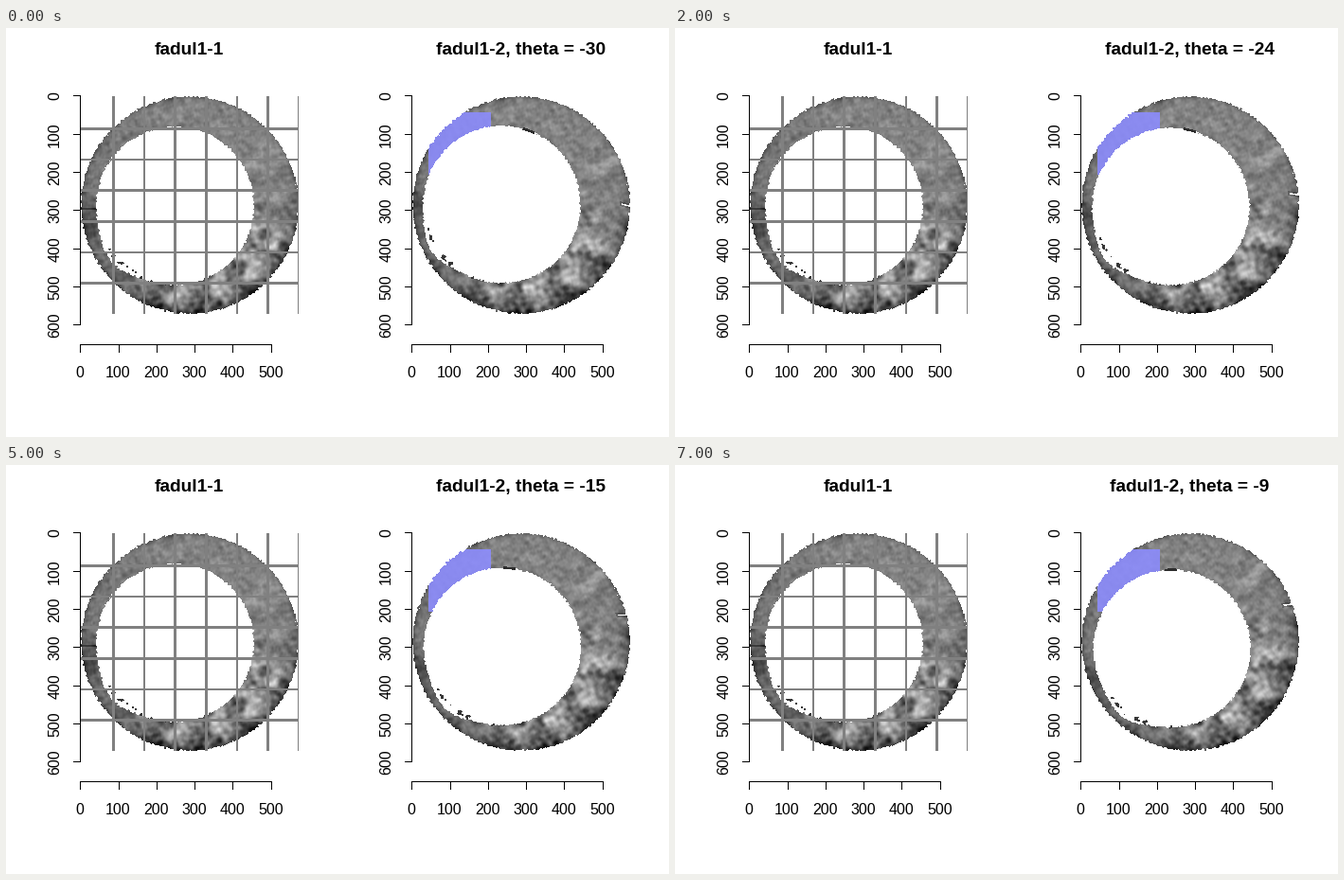
A matplotlib script that plays this animation: 700 by 432 pixels, repeating every 8 s.

```python
import numpy as np
import matplotlib.pyplot as plt
from matplotlib.animation import FuncAnimation

W, H, DPI = 700, 432, 100
PX = 72 / DPI    # points per pixel
SIZE = 230       # side of a scan in pixels
SCALE = 0.4031   # screen pixels per axis unit
TOP = 72
LEFT_X, RIGHT_X = 79, 429
THETAS = range(-30, -8, 3)

plt.rcParams["font.family"] = "Liberation Sans"
fig = plt.figure(figsize=(W / DPI, H / DPI), dpi=DPI, facecolor="white")
ax = fig.add_axes([0, 0, 1, 1])


def waves(seed, count, short, long):
    """Smooth random field as a sum of plane waves, unit variance."""
    rng = np.random.default_rng(seed)
    k = 2 * np.pi / rng.uniform(short, long, count)
    ang = rng.uniform(0, 2 * np.pi, count)
    phase = rng.uniform(0, 2 * np.pi, count)

    def field(x, y):
        total = np.zeros_like(x)
        for ki, a, p in zip(k, ang, phase):
            total += np.cos(ki * (x * np.cos(a) + y * np.sin(a)) + p)
        return total / np.sqrt(count / 2)

    return field


coarse = waves(3, 24, 16, 40)
cells = waves(5, 50, 7, 13)
fine = waves(8, 40, 3, 7)


def polar(x, y):
    return np.hypot(x, y), np.degrees(np.arctan2(-y, x))


def bump(angle, at, width):
    """Soft bell around a direction in degrees."""
    gap = (angle - at + 180) % 360 - 180
    return np.exp(-(gap / width) ** 2)


def shade(x, y, shift):
    """Grey levels: a lit top, and bright radial bands along the lower right."""
    d, p = polar(x, y)
    depth = 114.6 - d
    low = np.exp(-((p + 68 - shift) / 66) ** 4)
    bands = np.cos(np.radians(p + 18 - shift + 3 * coarse(x, y)) * 360 / 26)
    rim = np.exp(-(depth / 13) ** 2)

    tone = 118 + 13 * np.cos(np.radians(p - 65))
    tone += 20 * bump(p, 34 + shift, 4) - 35 * bump(p, shift - 170, 8)
    tone += low * (1 - rim) * (32 + 42 * bands)
    tone += low * rim * (30 * bands - 28)
    tone += (1 + 0.9 * low) * (6 * coarse(x, y) + 7 * cells(x, y))
    tone += 3 * fine(x, y)
    return tone - 38 * np.exp(-np.clip(depth, 0, None) / 2)


def ring(hole, radius, shift, turn=0):
    """Tone, mask and local coordinates of a scan turned counter-clockwise."""
    c = (SIZE - 1) / 2
    py, px = np.mgrid[:SIZE, :SIZE] - c
    a = np.radians(turn)
    x = px * np.cos(a) - py * np.sin(a)
    y = px * np.sin(a) + py * np.cos(a)

    rough = fine(x, y)
    rho, phi = polar(x - hole[0], y - hole[1])
    inner = radius + 6 * bump(phi, shift - 138, 18)
    inside = np.hypot(x, y) < 114.6 + 0.5 * rough
    mask = inside & (rho + 0.5 * rough > inner)
    tone = shade(x, y, shift)

    # loose dark crumbs along the lower left rim
    near = bump(phi, shift - 125, 32) * np.exp(-((rho - radius) / 2.5) ** 2)
    crumbs = inside & (near * (cells(x, y) + 0.6 * rough) > 0.55)
    tone[crumbs] = 55
    return tone, mask | crumbs, x, y


def picture(tone, mask):
    rgb = np.repeat(np.clip(tone, 15, 248)[..., None], 3, axis=2)
    rgb[~mask] = 255
    return rgb


def gridded_scan():
    tone, mask, x, y = ring((-15.5, 0.8), 83.3, 0)
    tone[(np.abs(y - 4) < 1.5) & (x < -97)] -= 45
    rgb = picture(tone, mask)
    unit = (np.arange(SIZE) + 0.5) / SCALE
    on = (unit > 81) & ((unit - 82) % 81 < 6.2)
    rgb[:, on] = 128
    rgb[on & (unit < 560)] = 128
    return rgb.astype(np.uint8)


def turned_scan(theta):
    hole, radius = (-20.5, -0.7), 83
    tone, mask, x, y = ring(hole, radius, -9, theta + 30)

    rho, phi = polar(x - hole[0], y - hole[1])
    flap = (np.abs(phi - 70) < 4.5) & (np.abs(rho - radius) < 1.3)
    tone[flap] = 45
    mask |= flap
    slit = np.abs(y + 0.5 - 0.25 * (x - 108))
    tone[(slit < 2.5) & (x > 104)] -= 35
    mask &= ~((slit < 0.8) & (x > 106))

    rgb = picture(tone, mask)
    cell = np.zeros_like(mask)
    cell[89 - TOP:155 - TOP, 446 - RIGHT_X:512 - RIGHT_X] = True
    cell &= mask
    rgb[cell] = 0.9 * np.array([140, 140, 252]) + 0.1 * rgb[cell]
    return rgb.astype(np.uint8)


def show(rgb, x):
    return ax.imshow(rgb, extent=(x, x + SIZE, TOP + SIZE, TOP),
                     interpolation="nearest", aspect="auto", zorder=1)


def line(xs, ys):
    """One-pixel line through the centres of whole pixels."""
    ax.plot(np.round(xs) + 0.5, np.round(ys) + 0.5, color="black", lw=PX,
            solid_capstyle="projecting", snap=False, zorder=3)


def label(x, y, text, size=16, **kw):
    return ax.text(x, y, text, fontsize=size * PX, ha="center", va="baseline",
                   rotation_mode="anchor", **kw)


def title(x, text):
    return label(x, 28, text, 19.2, weight="bold")


def axes_at(x0):
    y0, base, step = 71.4, 334, 100 * SCALE
    line([x0, x0], [y0, y0 + 6 * step])
    line([x0, x0 + 5 * step], [base, base])
    for i in range(7):
        y = y0 + i * step
        line([x0 - 7, x0], [y, y])
        label(x0 - 22, y + 0.5, str(100 * i), rotation=90)
    for i in range(6):
        x = x0 + i * step
        line([x, x], [base, base + 8])
        label(x, 369, str(100 * i))


axes_at(78.2)
axes_at(428.2)
title(193.5, "fadul1-1")
heading = title(543.5, "")

show(gridded_scan(), LEFT_X)
scans = [turned_scan(t) for t in THETAS]
scan = show(scans[0], RIGHT_X)
ax.set_xlim(0, W)
ax.set_ylim(H, 0)
ax.axis("off")


def update(i):
    scan.set_data(scans[i])
    heading.set_text(f"fadul1-2, theta = {THETAS[i]}")
    return scan, heading


anim = FuncAnimation(fig, update, frames=len(THETAS), interval=1000,
                     repeat=True, repeat_delay=0)
plt.show()
```
